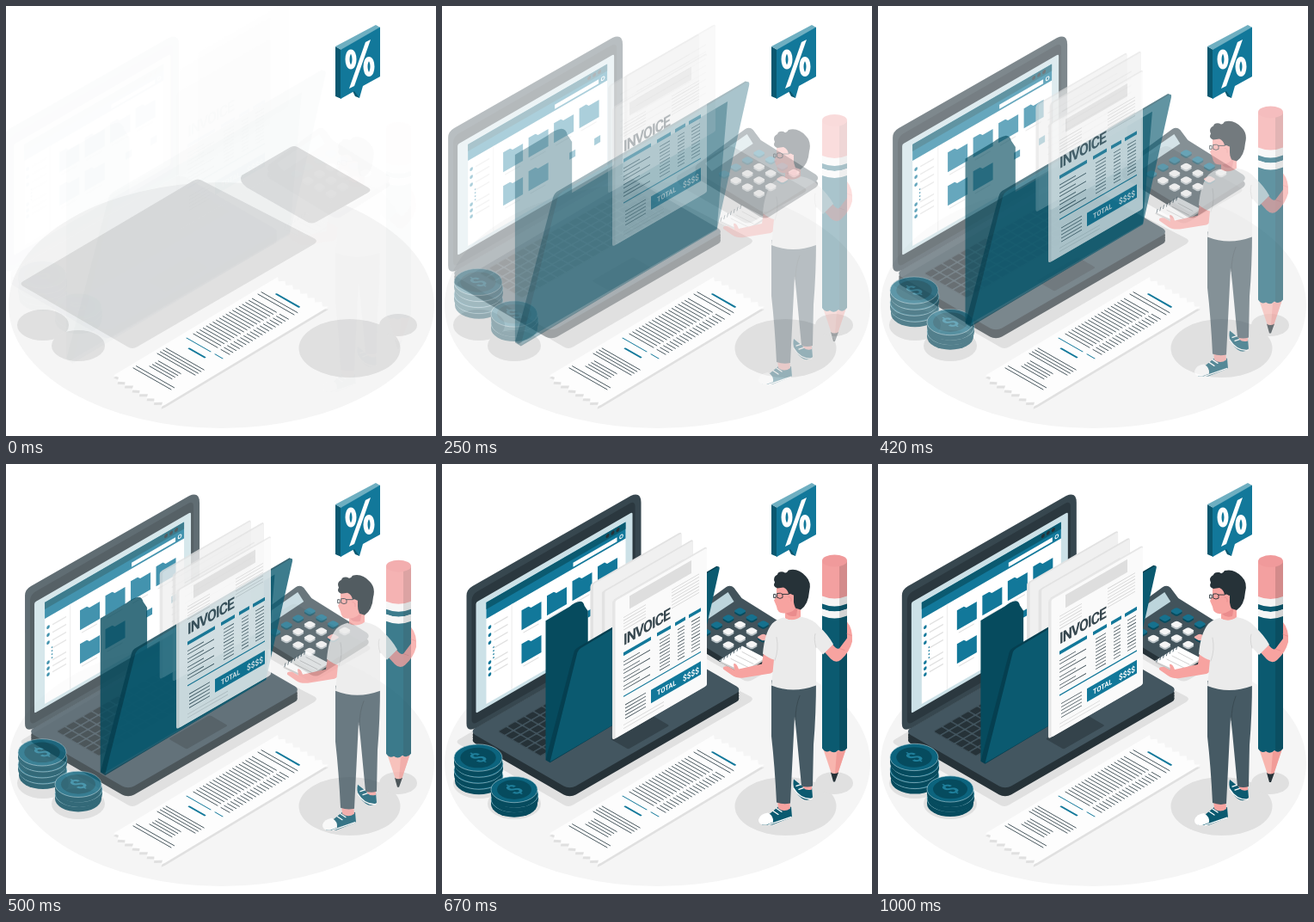
Recreate the animation shown at these times as an HTML page. Size 500 px wide and 500 px high, loop 1040 ms.

```html
<!DOCTYPE html>
<html lang="en">
<head>
<meta charset="utf-8">
<title>Invoice</title>
<style>
html, body { margin: 0; width: 100%; height: 100%; overflow: hidden; background: #fff; }
svg { display: block; width: 100vw; height: 100vh; }
text { font-family: Roboto, "Liberation Sans", sans-serif; font-weight: 700; }
</style>
</head>
<body>
<svg id="stage" viewBox="0 0 500 500"></svg>
<script>
const teal = '#12789a', deep = '#0b5a70', dark = '#064b5e', ink = '#37474f',
  night = '#263238', skin = '#f7a3a0', grey = '#e0e0e0';

const poly = (fill, points) => `<polygon fill="${fill}" points="${points}"/>`;
const path = (fill, d) => `<path fill="${fill}" d="${d}"/>`;
const stroke = (color, width, d) =>
  `<path fill="none" stroke="${color}" stroke-width="${width}" stroke-linecap="round" d="${d}"/>`;
const rect = (fill, x, y, w, h, r = 0) =>
  `<rect fill="${fill}" x="${x}" y="${y}" width="${w}" height="${h}" rx="${r}"/>`;
const oval = (fill, x, y, rx, ry, more = '') =>
  `<ellipse fill="${fill}" cx="${x}" cy="${y}" rx="${rx}" ry="${ry}" ${more}/>`;
const group = (transform, body) => `<g transform="${transform}">${body}</g>`;
const wall = (x, y, body) => group(`translate(${x} ${y}) skewY(-30)`, body);
const floor = (x, y, body) => group(`matrix(1 -.577 1 .577 ${x} ${y})`, body);
const range = (n, f) => Array.from({ length: n }, (_, i) => f(i)).join('');
// n parallel lines, horizontal in the current plane
const rows = (color, width, x1, x2, y, n, step) =>
  `<path fill="none" stroke="${color}" stroke-width="${width}" d="${range(n, i => `M${x1} ${y + i * step}H${x2}`)}"/>`;

function scenery() {
  return oval('#f5f5f5', 250.5, 348, 247.5, 143) +
    path(grey, 'M20 320L218 203Q223 200 228 203L358 270Q364 273 358 277L153 396Q147 400 141 396L20 326Q15 323 20 320Z') +
    path(grey, 'M274 197L331 164Q335 162 339 164L421 211Q426 214 421 217L361 251Q355 254 350 251L280 211Q270 203 274 197Z') +
    oval(grey, 43, 371, 30, 18) + oval(grey, 84, 395, 31, 18) +
    oval(grey, 399.5, 398, 59, 34) + oval(grey, 456, 371, 22, 13);
}

function receipt() {
  let edge = 'M0 0';
  for (let i = 0; i < 7; i++) edge += `L${i % 2 ? 0 : 1} ${i * 8.5 + 5}L-4 ${i * 8.5 + 8.5}`;
  edge += 'L0 60L190 60';
  for (let i = 6; i >= 0; i--) edge += `L187 ${i * 8.5 + 5}L191 ${i * 8.5}`;
  const sheet = (fill, y) => group(`matrix(1 -.6 1 .57 125 ${y})`, path(fill, edge + 'Z'));
  // n lines across the strip, starting at distance a along it
  const bars = (color, width, b1, b2, a, n, step) =>
    stroke(color, width, range(n, i => `M${a + i * step} ${b1}V${b2}`));
  return sheet(grey, 432.5) + sheet('#fdfdfd', 429.5) + group('matrix(1 -.6 1 .57 125 430)',
    bars(ink, .7, 4, 48, 19, 2, 3.6) + bars(ink, .7, 12, 38, 30, 4, 3.4) +
    bars(ink, .7, 4, 48, 47, 4, 3.4) + bars(teal, 2, 18, 36, 70, 1, 0) +
    stroke(teal, .9, 'M79 6V34M79 39V48') +
    bars(ink, .7, 6, 34, 87, 19, 3.8) + bars(ink, .7, 38, 48, 87, 19, 3.8) +
    bars(ink, .7, 5, 47, 163, 2, 4) + bars(teal, 2, 16, 42, 173.5, 1, 0));
}

function bubble() {
  const ring = (x, y) => oval('none', x, y, 4, 9, 'stroke="#fff" stroke-width="5"');
  return poly('#0a5870', '383,47 390,51 390,108 383,105') +
    poly('#6fafc1', '383,47 430,22 435,25 390,51') +
    poly('#0a5870', '402,97 406,105 411,107 409,92') +
    path(teal, 'M389 51L435 24.5V82L415 93L411 107L405 99L389 108Z') +
    ring(401, 62) + ring(422, 70.5) + poly('#fff', '418,42 424,39 405,93 399,96');
}

function laptop() {
  const icon = (x, y) => path(teal, `M${x} ${y}h8l3 3h12v20h-23z`) +
    rows(grey, 1.2, x + 2, x + 20, y + 27, 1, 0);
  const dots = [28, 37, 46, 69, 76, 83];
  const screen = rect('#fff', 0, 0, 162, 118) + rect(teal, 0, 0, 162, 19) + rect(deep, 0, 0, 162, 8) +
    rect('#fff', 101, 12, 51, 5) + oval('none', 157, 14, 1.8, 2, 'stroke="#fff"') +
    [141, 147, 153].map(x => oval(night, x, 4, 2, 2.2)).join('') +
    rect('#eee', 29, 19, 1.2, 99) +
    dots.map(y => oval(teal, 4, y + 3, 1.8, 2)).join('') +
    range(4, i => oval(teal, 8.5, 57 + i * 4, .8, .9)) +
    rows(grey, 1.5, 9, 25, 31, 4, 9) + rows(grey, 1.5, 9, 25, 72, 3, 7) +
    range(4, i => icon(41 + i * 29.5, 33)) + range(2, i => icon(41 + i * 29.5, 72)) +
    rect(teal, 118, 78, 7, 8) + rect(teal, 147, 78, 7, 8);
  const slab = (y, fill) => floor(33, y, rect(fill, 0, 0, 201, 117, 7));
  return [10, 7, 4].map(d => slab(311 + d, night)).join('') + slab(311, '#435660') +
    floor(36, 311, rect('#37474f', 15, 15, 175, 50, 2) + rect('url(#keys)', 15, 15, 175, 50) +
      rect('#34434b', 73, 88, 48, 21, 2)) +
    path('#37474f', 'M30 153Q30 146 37 142L221 37Q233 32 233 45V196L41 307Q30 312 30 302Z') +
    wall(36, 152, rect('#2b383f', 0, 0, 190, 152, 6)) +
    wall(41, 161, rect('#cce1e7', 0, 0, 182, 129, 2)) + wall(53, 161, screen);
}

function coins() {
  const coin = (x, y, r) => path(dark, `M${x - r} ${y}v6a${r} ${r * .56} 0 0 0 ${2 * r} 0v-6z`) +
    oval('#0c647e', x, y, r, r * .56, 'stroke="#b5d3dc" stroke-width=".6"');
  const face = (x, y, r) => oval(dark, x, y, r * .74, r * .42) +
    group(`matrix(.85 -.42 .85 .5 ${x} ${y})`,
      `<text text-anchor="middle" y="8" font-size="23" fill="#1f7f9b">$</text>`);
  return range(4, i => coin(43 - (i % 2), 364 - 7 * i, 28)) + face(42, 343, 28) +
    range(3, i => coin(84 + (i % 2), 391 - 5.5 * i, 27)) + face(84, 380, 27);
}

function calculator() {
  const key = (i, j) => {
    const fill = j === 0 || (i === 2 && j < 3) ? '#16718e' : i === 1 && j === 3 ? '#f4b0ad' : '#f5f5f5';
    const slab = (y, c) => floor(310.5 + 13.5 * (i + j), 187 - 8 * i + 7.5 * j + y, rect(c, 0, 0, 7.5, 7.5, 2));
    return slab(2, fill === '#f5f5f5' ? '#b9c2c6' : dark) + slab(0, fill);
  };
  const body = 'M273 184L329 143Q334 140 338 144L347 156L411 196Q416 200 411 204L357 238Q352 241 346 238L274 194Q268 190 273 184Z';
  return group('translate(0 7)', path(night, body)) + path('#42535b', body) +
    poly('#bdd5dc', '282,183 331,149 338,160 290,192') +
    range(4, j => range(4, n => key(2 - n, j)));
}

const folderBack = () =>
  path(dark, 'M123 183L150 167Q156 162 162 161Q166 161 167 166L171 172V215L302 138L293 245L126 342L123 340Z');
const folderFlap = () =>
  path('#053f50', 'M155 219Q156 215 160 213L317 121L320 122L292 246L128 344L123 341Z') +
  path(deep, 'M159 219Q160 216 163 214L318 122Q321 121 320 125L293 246L128 343Z');

const sheet = (x, y, w, h, fill, edge, body = '') =>
  wall(x, y, rect(edge, 0, 0, w, h, 3) + rect(fill, 3.5, 2, w - 3.5, h - 2, 2) + body);
const backSheet = (x, y) => sheet(x, y, 106, 125, '#f0f0f0', '#e2e2e2', rows('#e3e3e3', 1.5, 14, 95, 18, 8, 8));

function invoice() {
  const label = (x, y, size, fill, word, spacing = 0) =>
    `<text transform="translate(${x} ${y}) scale(.866 1)" font-size="${size}" fill="${fill}" letter-spacing="${spacing}">${word}</text>`;
  const head = [[13, 45], [52, 68], [73, 85], [89, 103]];
  return sheet(198, 162, 110, 162, '#fafafa', '#e6e6e6',
    rect('#dedede', 20, 6, 72, 15) +
    rows('#d0d0d0', .8, 13, 39, 27, 5, 3.6) + rows('#d0d0d0', .8, 69, 101, 27, 7, 3.6) +
    label(13, 59.5, 18.2, ink, 'INVOICE', -1.1) +
    head.map(([a, b]) => rect(teal, a, 67.5, b - a, 4)).join('') +
    rows(ink, .9, 13, 32, 78.5, 4, 9.5) + rows(ink, .9, 13, 44, 82.5, 4, 9.5) +
    head.slice(1).map(([a, b]) => rows(ink, .8, a + 3, b - 1, 77.5, 10, 3.9)).join('') +
    rect(teal, 13, 118, 90, 1.3) +
    rows(ink, .8, 15, 39, 129.5, 5, 4) + rect(teal, 45, 129.5, 58, 15.5) +
    label(52, 140.5, 8.5, '#fff', 'TOTAL') + label(82, 141.5, 9.5, '#fff', '$$$$') +
    rows('#d5d5d5', .8, 13, 60, 152, 2, 4));
}

function pencil() {
  const band = (fill, y, h) =>
    path(fill, `M442 ${y}Q456.5 ${y + 6} 471 ${y}V${y + h}Q456.5 ${y + h + 6} 442 ${y + h}Z`);
  return poly('#f8b5ae', '443,329 470,329 460,359 453,359') +
    poly('#f19c98', '459,333 470,329 460,359 457,359') +
    path(night, 'M452 357Q456 360 461 357L457 368H455Z') +
    band('#f3a0a0', 111, 42) + band('#f5f5f5', 152, 9) + band(deep, 161, 6) + band('#f5f5f5', 167, 8) +
    path(deep, 'M442 175Q456.5 181 471 175V329Q466 335 461 331Q456 336 451 332Q446 335 442 329Z') +
    path('#0002', 'M462 111H471V329Q466 335 462 331Z') +
    oval('#f09a9b', 456.5, 111, 14.5, 7);
}

function man() {
  const shirt = '#ebebeb', pants = '#465a64';
  const shoes = path(deep, 'M374 411L391 397Q399 401 406 397L407 409L384 418H372Z') +
    path('#fff', 'M368 412Q370 405 379 404Q386 408 385 415L377 418Q368 419 368 412Z') +
    stroke('#fff', 1.3, 'M385 402l6 4M389 399l6 4M380 418L406 409') +
    path(deep, 'M409 365L420 374Q426 377 430 374L431 386Q425 392 418 387Q406 377 409 365Z') +
    stroke('#fff', 1.3, 'M412 373l6 -2M415 377l6 -2M409 376Q417 389 430 388');
  const legs = path(skin, 'M390 388H404L405 399Q398 404 391 399ZM419 368H430V377Q424 379 420 375Z') +
    path(pants, 'M383 250L435 248Q435 290 432 325L431 373Q425 375 418 373L412 310L410 292L405 393Q397 395 389 392Q387 350 383 315Z') +
    stroke(ink, .8, 'M411 296Q411 280 416 268');
  const notebook = poly('#c9c9c9', '322,229 350,213 376,226 350,243') +
    poly('#fff', '322,227 349,210 376,224 350,240') +
    stroke('#455a64', .9, range(7, i => `M${324 + i * 3.8} ${228 - i * 2.4}l1 -4`)) +
    stroke('#c5c5c5', .8, 'M336 225l20 10M342 221l20 10M349 217l17 9');
  const arms = path(skin, 'M374 217L390 223Q391 238 382 242L351 247Q343 248 337 244L327 237Q326 233 333 234L340 238L339 231Q342 229 345 237L372 231Z') +
    path(skin, 'M442 214L454 208Q459 215 462 213L471 201L471 182Q478 190 477 205Q474 217 464 226Q458 231 452 225Z') +
    stroke('#e58788', .7, 'M462 213l6 2M471 196l5 2');
  const torso = path(shirt, 'M397 177Q408 183 417 176Q432 179 438 187Q449 197 455 208L443 220L435 211V256Q408 266 383 256L386 226Q381 225 373 219Q375 195 384 184Q389 179 397 177Z') +
    stroke('#d0d0d0', .8, 'M389 200Q392 214 387 227M435 212Q432 202 434 196');
  const head = path(skin, 'M389 140L417 140L417 177Q408 183 399 178V172Q390 173 389 164L386 157L389 152Z') +
    path('#ea8c8d', 'M400 172Q409 171 414 163L412 175Q404 177 400 172Z') +
    path(night, 'M390 143Q384 141 387 136Q384 130 390 127Q391 123 397 124Q400 127 403 122Q414 119 423 129Q430 136 427 147Q426 162 417 168L411 166Q408 160 409 151L403 150Q402 144 397 142Z') +
    oval(skin, 405, 155, 4, 5.5) + stroke('#e58788', .7, 'M403 153q4 0 3 5') +
    stroke(night, .9, 'M386 150h2v4h-2zM390 149q4 -1 6 1v4q-3 2 -6 0zM396 150L403 150');
  return shoes + legs + head + notebook + arms + torso;
}

const shift = (dx, dy) => u => `translate(${dx * u} ${dy * u})`;
const grow = u => `translate(223 209) scale(${1 + .45 * u}) translate(-223 -209)`;
const parts = [
  [laptop(), shift(-27, 0)],
  [coins(), shift(0, -26)],
  [calculator(), shift(28, 0)],
  [folderBack(), grow],
  [backSheet(171, 143), shift(26, -59)],
  [backSheet(184, 153), shift(33, -84)],
  [folderFlap(), grow],
  [invoice(), shift(0, -52)],
  [pencil(), shift(0, 26)],
  [man(), shift(0, 26)]
];

const stage = document.getElementById('stage');
stage.innerHTML = `<defs><pattern id="keys" x="15" y="15" width="10.3" height="8.33" patternUnits="userSpaceOnUse">
  ${rect('#435660', 0, 0, 10.3, 8.33) + rect(night, .7, .7, 8.9, 6.9, 1)}</pattern></defs>` +
  scenery() + receipt() + bubble() + parts.map(([body]) => `<g class="part">${body}</g>`).join('');
const nodes = [...stage.querySelectorAll('.part')];

// remaining distance at every fourth step, with a slight rebound at the end
const keys = [1.18, 1, .67, .295, .055, 0, .08];
function remaining(step) {
  const i = Math.min(5, Math.floor(step / 4)), f = step / 4 - i;
  const at = n => keys[Math.max(0, Math.min(6, n))];
  const [a, b, c, d] = [at(i - 1), at(i), at(i + 1), at(i + 2)];
  return b + f / 2 * (c - a + f * (2 * a - 5 * b + 4 * c - d + f * (3 * (b - c) + d - a)));
}

const start = performance.now();
function draw() {
  const t = (performance.now() - start) % 1040;
  const step = Math.min(24, Math.floor((t + 4) / 41.6));
  const u = remaining(step < 2 ? 0 : step);
  const alpha = Math.min(1, Math.max(.012, (step - 1.3) / 13.5));
  nodes.forEach((node, i) => {
    node.setAttribute('transform', parts[i][1](u));
    node.setAttribute('opacity', alpha);
  });
  requestAnimationFrame(draw);
}
draw();
</script>
</body>
</html>
```
